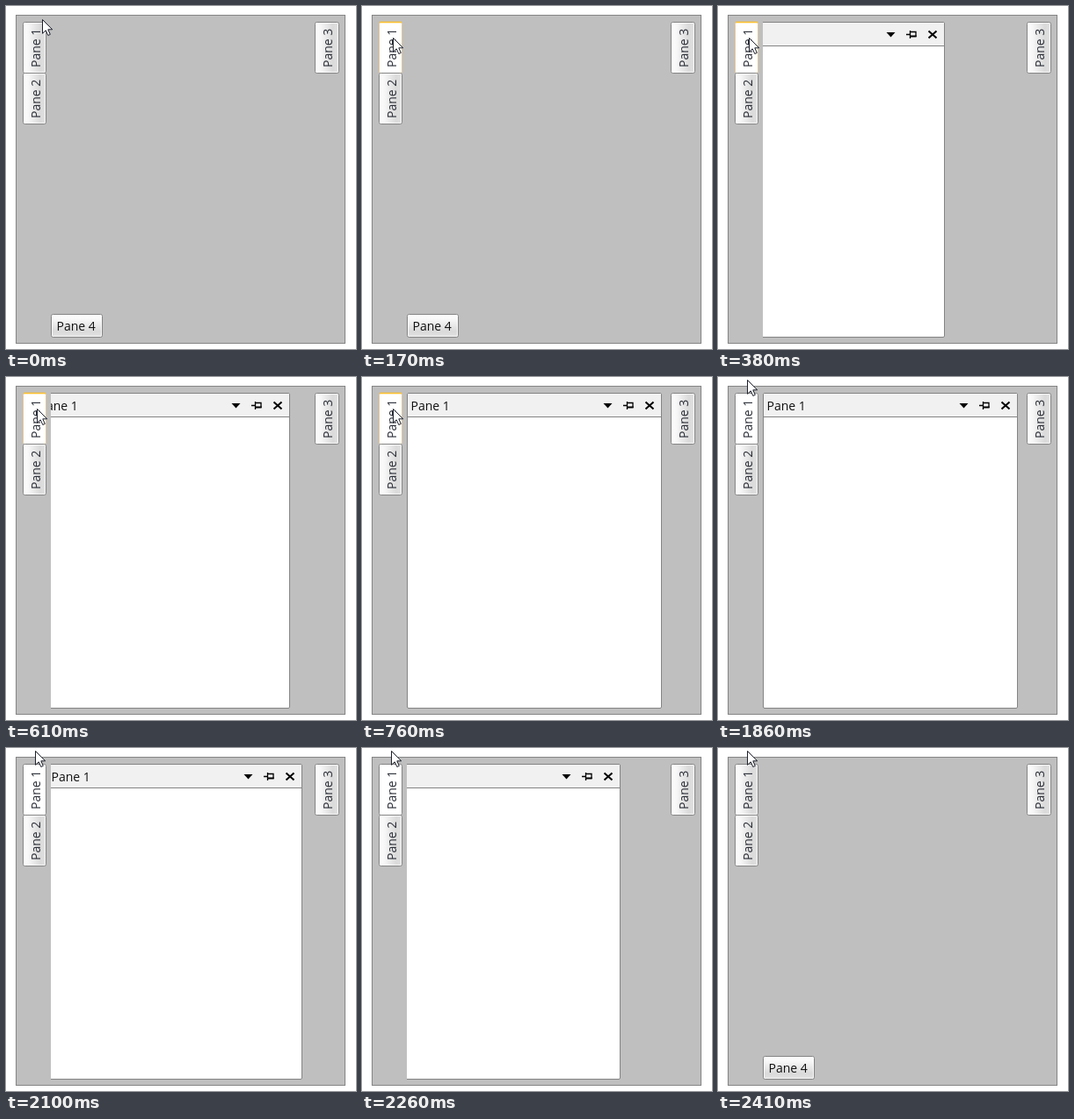
An HTML page for the animation above (2870 ms loop, 398 by 391 pixels).

```html
<!DOCTYPE html>
<html lang="en">
<head>
<meta charset="utf-8">
<title>Auto-hide panes</title>
<style>
html, body { margin: 0; width: 100%; height: 100%; overflow: hidden; background: #fff; }
svg { display: block; }
text { font: 14px "Open Sans", "Noto Sans", sans-serif; fill: #111; }
.side { fill: #2c2f38; }
.edge { stroke: #848484; }
.inner { fill: none; stroke: #fff; stroke-opacity: .75; }
</style>
</head>
<body>
<svg id="stage" width="398" height="391" viewBox="0 0 398 391">
  <defs>
    <linearGradient id="across">
      <stop stop-color="#fff"/><stop offset=".25" stop-color="#f6f6f6"/>
      <stop offset=".75" stop-color="#dadada"/><stop offset="1" stop-color="#e2e2e2"/>
    </linearGradient>
    <linearGradient id="down" href="#across" x2="0" y2="1"/>
  </defs>
  <rect x="11.5" y="10.5" width="374" height="374" fill="#bfbfbf" stroke="#858585"/>
  <g id="tabs"></g>
  <svg id="view" x="51" y="18" width="291" height="360">
    <g id="pane">
      <rect class="edge" x=".5" y=".5" width="289" height="359" rx="1.5" fill="#fff"/>
      <path d="M1 1H289V27H1z" fill="#f1f1f1"/>
      <path class="edge" d="M1 27.5H289"/>
      <text x="4.5" y="20">Pane 1</text>
      <path d="M223.5 12H233.5L228.5 17.5z"/>
      <path d="M246 14.5H250.5M250.5 10V19M251 11.5H257V17" fill="none" stroke="#000" stroke-width="1.3"/>
      <path d="M251 16.5H257.6" stroke="#000" stroke-width="2"/>
      <path d="M271.5 10.5L280.5 18.5M280.5 10.5L271.5 18.5" stroke="#000" stroke-width="2"/>
    </g>
  </svg>
  <path id="cursor" d="M.5 .5V16.3L4.2 12.8L6.8 18.5L9.3 17.4L6.8 11.8H11.7z" fill="#fff" stroke="#1c1f2b"/>
</svg>
<script>
const LOOP = 2870, WIDTH = 290;
const $ = id => document.getElementById(id);

function tab(name, x, y, w, h) {
  const side = h > w;
  const place = side
    ? `class="side" transform="translate(${x + 19} ${y + 51.5}) rotate(-90)"`
    : `x="${x + 6}" y="${y + 18.5}"`;
  $("tabs").insertAdjacentHTML("beforeend", `<g>
    <rect class="edge" x="${x}" y="${y}" width="${w}" height="${h}" rx="2" fill="url(#${side ? "across" : "down"})"/>
    <rect class="inner" x="${x + 1}" y="${y + 1}" width="${w - 2}" height="${h - 2}" rx="1"/>
    <path d="M${x + .5} ${y}h${w - 1}" stroke="#ffc02e" stroke-width="1.6" visibility="hidden"/>
    <text ${place}>${name}</text></g>`);
  return $("tabs").lastElementChild;
}

const first = tab("Pane 1", 19.5, 18.5, 26, 58);
tab("Pane 2", 19.5, 76.5, 26, 58);
tab("Pane 3", 351.5, 18.5, 27, 58);
tab("Pane 4", 51.5, 351.5, 58, 26);
const [face, , glow] = first.children;

// Number of updates shown so far, out of n spread evenly from start to end.
const steps = (t, start, end, n) =>
  t < start ? 0 : Math.min(n, 1 + Math.floor((t - start) * (n - 1) / (end - start)));

function shift(t) {
  const open = steps(t, 380, 760, 6), close = steps(t, 2030, 2410, 6);
  if (!open || close === 6) return WIDTH;
  if (close) return WIDTH * (.022 + .095 * close) ** 2;
  return open < 6 ? WIDTH * (.63 - .095 * open) ** 2 : 0;
}

function pointer(t) {
  const leave = (steps(t, 1390, 1860, 7) / 7) ** 1.2;
  if (leave) return [35 - 2 * leave, 36 - 33 * leave];
  const enter = steps(t, 70, 170, 2) / 2;
  return [41 - 6 * enter, 15 + 21 * enter];
}

function draw(now) {
  const t = now % LOOP;
  const [x, y] = pointer(t).map(Math.round);
  const hover = y >= 18, active = t >= 70 && t < 2410;
  const offset = Math.round(shift(t));
  $("cursor").setAttribute("transform", `translate(${x} ${y})`);
  $("pane").setAttribute("transform", `translate(${-offset})`);
  $("view").style.display = offset < WIDTH ? "" : "none";
  face.setAttribute("fill", active ? "#fff" : "url(#across)");
  face.style.stroke = hover ? "#e3c69a" : "";
  glow.setAttribute("visibility", hover ? "visible" : "hidden");
}

const begin = performance.now();
function tick() {
  draw(performance.now() - begin);
  requestAnimationFrame(tick);
}
tick();
</script>
</body>
</html>
```
